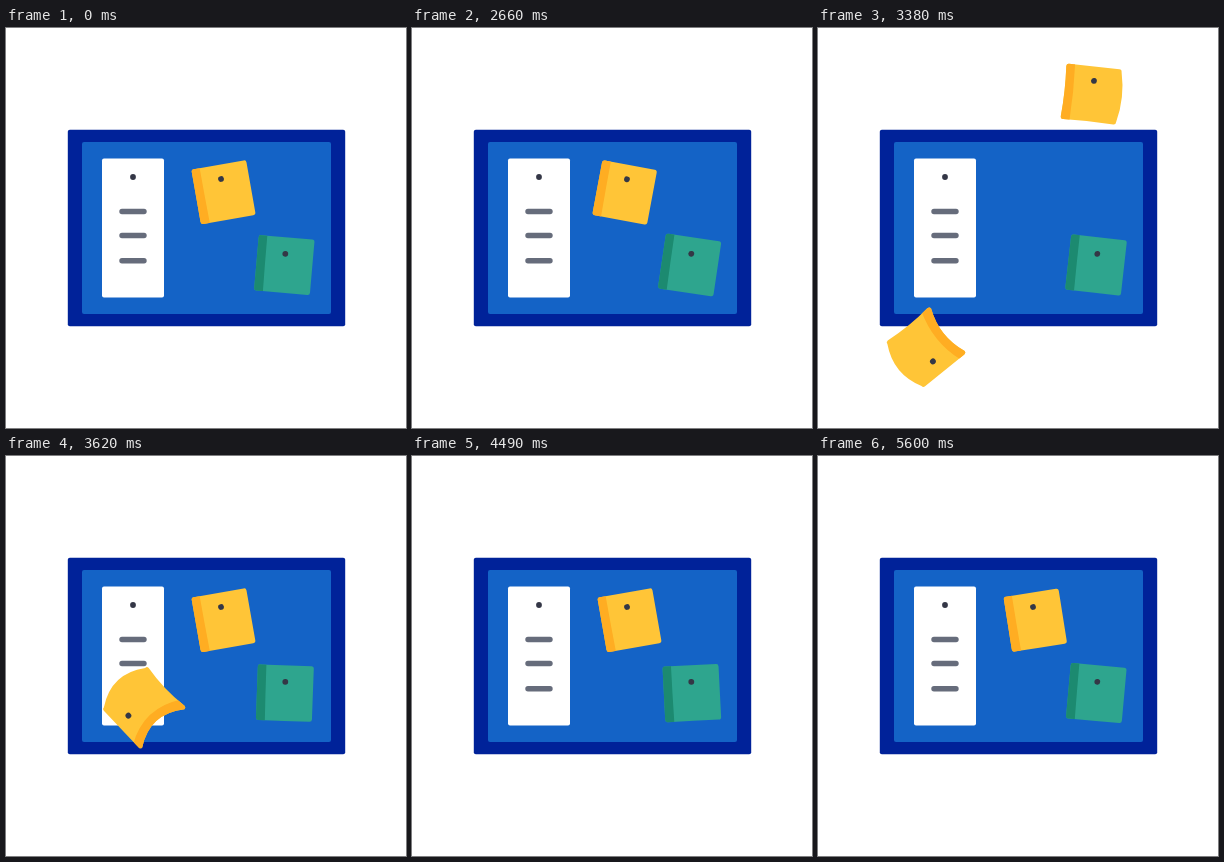
These frames come from a looping animation (400 by 400 pixels, 5660 ms). An HTML page with a canvas:

```html
<!DOCTYPE html>
<html lang="en">
<head>
<meta charset="utf-8">
<title>Notice board</title>
<style>
  html, body { margin: 0; width: 100%; height: 100%; overflow: hidden; background: #fff; }
  canvas { display: block; width: 100vw; height: 100vh; }
</style>
</head>
<body>
<canvas id="stage"></canvas>
<script>
const LOOP = 5660, REST = 2000, STEP = 30;
const DETACH = 2640, GUST = 3080, CURL = 3620, GONE = 4270;
const ENTER = 3110, LAND = 3590;

const canvas = document.getElementById('stage');
const ctx = canvas.getContext('2d');
const scale = Math.max(1, window.devicePixelRatio || 1);
canvas.width = canvas.height = 400 * scale;

const YELLOW = { paper: '#ffc537', strip: '#ffad22', left: -27.6, top: -14.4 };
const GREEN = { paper: '#2ea58e', strip: '#1c8a70', left: -28, top: -16.5 };
const PIN = '#343746';
const PINNED = [215, 151], PINNED_TURN = -10;

const { sin, cos, exp, min, max, PI } = Math;
const progress = (t, from, to) => min(1, max(0, (t - from) / (to - from)));
const ramp = (t, from, to) => (1 - cos(PI * progress(t, from, to))) / 2;

function bezier(u, a, b, c, d) {
  const v = 1 - u;
  return [0, 1].map(i =>
    v * v * v * a[i] + 3 * v * v * u * b[i] + 3 * v * u * u * c[i] + u * u * u * d[i]);
}

function rect(x, y, w, h, r, fill) {
  ctx.fillStyle = fill;
  ctx.beginPath();
  ctx.roundRect(x, y, w, h, r);
  ctx.fill();
}

function dot(x, y) {
  ctx.fillStyle = PIN;
  ctx.beginPath();
  ctx.arc(x, y, 2.9, 0, PI * 2);
  ctx.fill();
}

// The pin is the local origin; bend bows the sides, grow lengthens the sheet.
function note(look, [x, y], turn, bend = 0, grow = 0) {
  const { top } = look, l = look.left - bend / 2, r = 28 - bend / 2;
  const b = top + 55.6 + grow, foot = l - grow / 5, mid = (top + b) / 2;
  const bow = bend * 2, strip = bend * bend / 5, lift = bend * 0.4, c = 2.5;
  ctx.save();
  ctx.translate(x, y);
  ctx.rotate(turn * PI / 180);
  ctx.save();
  ctx.beginPath();
  ctx.moveTo(l + c, top);
  ctx.lineTo(r - c, top);
  ctx.quadraticCurveTo(r, top, r, top + c);
  ctx.quadraticCurveTo(r + bow, mid, r, b - c);
  ctx.quadraticCurveTo(r, b, r - c, b);
  ctx.quadraticCurveTo((foot + r) / 2, b - lift, foot + c, b);
  ctx.quadraticCurveTo(foot, b, foot, b - c);
  ctx.quadraticCurveTo(l + strip, mid, l, top + c);
  ctx.quadraticCurveTo(l, top, l + c, top);
  ctx.fillStyle = look.paper;
  ctx.fill();
  ctx.clip();
  ctx.fillStyle = look.strip;
  ctx.beginPath();
  ctx.moveTo(l - 2, top - 2);
  ctx.lineTo(l + 8.5, top - 2);
  ctx.quadraticCurveTo(l + 8.5 + strip, mid, foot + 9, b + 2);
  ctx.lineTo(foot - 2, b + 2);
  ctx.fill();
  ctx.restore();
  dot(0, 0);
  ctx.restore();
}

// Swings on its pin, drops, then is carried round a loop and out below.
function looseNote(t) {
  const air = max(0, t - GUST), fall = progress(t, DETACH, GUST);
  const start = [197.8, 290.5], curl = [122.4, 259.7];
  let at = [PINNED[0] - 17.2 * fall * fall, PINNED[1] + 139.5 * fall * fall];
  if (t > CURL) at = bezier(progress(t, CURL, GONE), curl, [194, 198], [321, 248], [265, 460]);
  else if (t > GUST) at = bezier(progress(t, GUST, CURL), start, [170, 400], [50, 320], curl);

  const swing = PINNED_TURN - 22 * sin(0.0068 * (min(t, DETACH) - REST));
  const s = t - GUST, spin = 27.5 + 0.39 * s - 0.00004 * s * s;
  const turn = t < DETACH ? swing : max(swing, spin);
  note(YELLOW, at, turn, 10 * sin(PI * air / 1140), 0.0118 * air);
}

// Blows in over the top edge, lands on the pin and swings to rest.
function freshNote(t) {
  const u = progress(t, ENTER, LAND), away = 1 - u, s = max(0, t - CURL);
  const at = bezier(u, [450, 152], [330, 18], [225, 18], PINNED);
  const swing = 68 * exp(-0.002 * s) * sin(PI * s / 870);
  note(YELLOW, at, PINNED_TURN + 85 * away * away + swing, 7 * away);
}

function greenNote(t) {
  const turn = 5 + 4.7 * ramp(t, REST, 3000) - 13.9 * ramp(t, 3000, 4170)
    + 9.4 * ramp(t, 4170, 5500);
  note(GREEN, [279.3, 225.8], turn);
}

function draw(t) {
  ctx.setTransform(scale, 0, 0, scale, 0, 0);
  rect(0, 0, 400, 400, 0, '#fff');
  rect(61.8, 101.8, 277.4, 196.4, 2, '#002299');
  rect(76, 114, 249, 172, 2, '#1463c6');
  rect(96, 130.5, 62, 139, 2, '#fff');
  for (const y of [183.5, 207.5, 232.8]) rect(113.3, y - 2.7, 27.4, 5.4, 2.7, '#666c7b');
  dot(127, 149);
  greenNote(t);
  if (t >= ENTER) freshNote(t);
  if (t < GONE) looseNote(t);
}

function tick() {
  const t = performance.now() % LOOP;
  draw(max(REST, REST + Math.floor((t - REST) / STEP) * STEP));
  requestAnimationFrame(tick);
}
tick();
</script>
</body>
</html>
```
